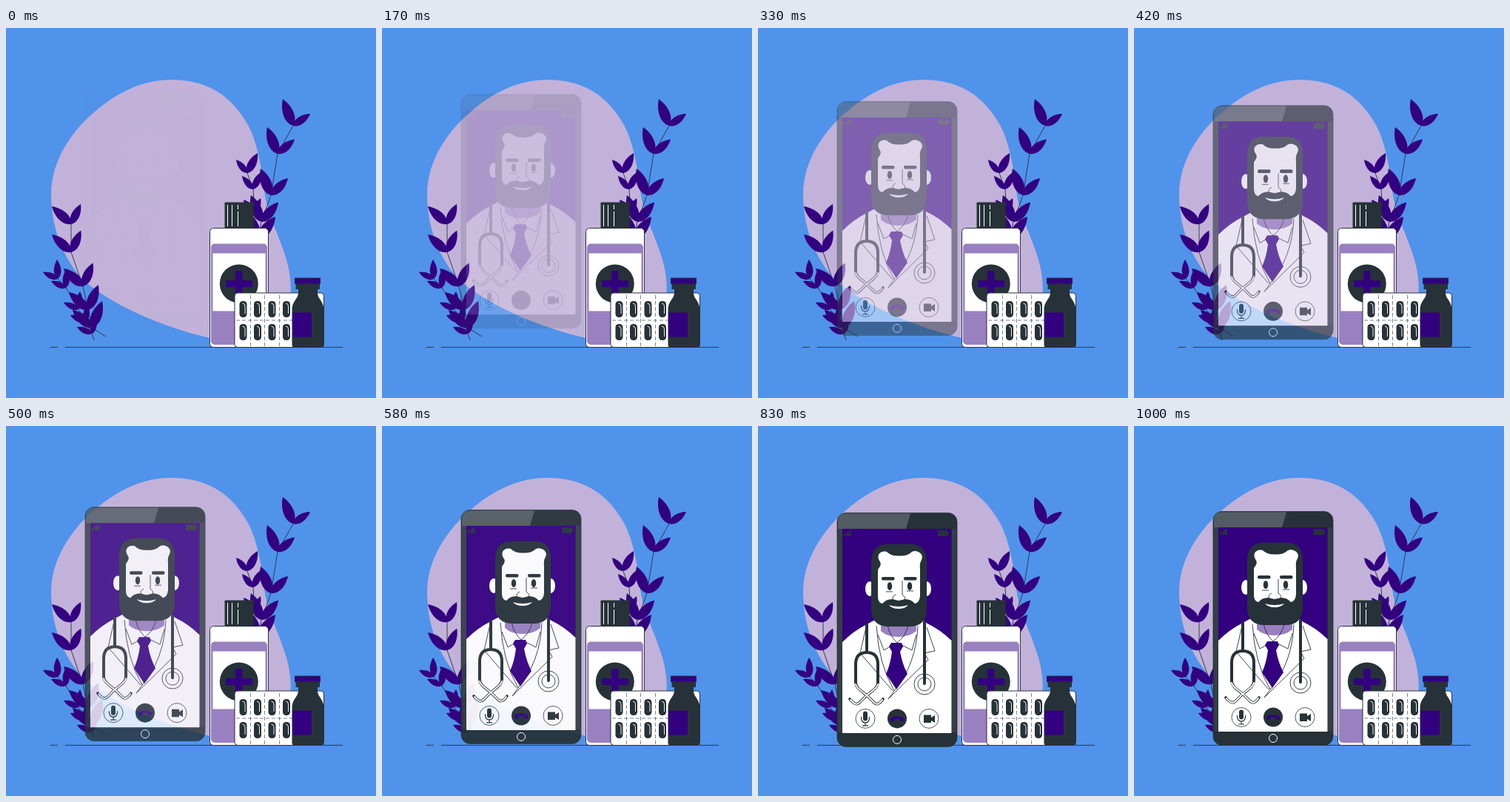
Recreate the animation shown at these times as an HTML page. Size 500 by 500 pixels, loop 1.04 s.

```html
<!DOCTYPE html>
<html lang="en">
<head>
<meta charset="utf-8">
<title>Online doctor</title>
<style>
  html, body { margin: 0; height: 100%; overflow: hidden; background: #5093eb; }
  svg { display: block; width: 100vw; height: 100vh; }
  .ink { fill: #263238; }
  .violet { fill: #330080; }
  .lilac { fill: #9980c0; }
  .white { fill: #fff; }
  .line { fill: none; stroke: #263238; stroke-width: .9; stroke-linejoin: round; }
  .card { fill: #fff; stroke: #263238; }
  .tube { fill: none; stroke: #263238; stroke-width: 4; stroke-linecap: round; }
  .arm { stroke-width: 3.6; }
  .core { fill: none; stroke: #fff; stroke-width: 1.9; stroke-linecap: round; }
  .dash { fill: none; stroke: #263238; stroke-width: .6; stroke-dasharray: 5 3; }
</style>
</head>
<body>
<svg viewBox="0 0 500 500">
  <path fill="#c2b2d9" d="M223 70C266 70 302 86 327 131C341 157 346 195 349 220C354 256 368 276 379 313C386 338 387 362 380 380C365 415 320 424 276 419C240 411 165 388 112 347C82 322 61 275 61 225C61 180 88 140 120 113C150 87 185 70 223 70Z"/>
  <path class="line" d="M59.500 431.400H70M80 431.400H455"/>

  <g id="plants" class="violet"></g>

  <g id="phone" opacity="0">
    <rect class="ink" x="107" y="115.500" width="162" height="316" rx="12" stroke="#263238" stroke-width=".8"/>
    <path fill="#525c62" d="M108 137V127Q108 116.300 119 116.300H206L200 137Z"/>
    <path fill="#343f45" d="M108 137H114V412H108ZM261.500 137H268V412H261.500Z"/>
    <rect class="violet" x="114" y="137" width="147.500" height="276"/>
    <path class="ink" d="M116 147V144H118V147ZM118.500 147V142H120.500V147ZM121 147V140.500H123V147ZM123.500 147V139H126V147ZM243 139H256V141H258V145H256V147H243Z"/>

    <!-- Coat and neck -->
    <path class="white" d="M114 290Q129 275 147 266L160 259H220L229 265Q246 273 261.500 288V413H114Z"/>
    <path class="lilac" d="M166 256H214V275Q204 283 190 283Q175 283 166 275Z"/>
    <path class="line" d="M146 270L138 305L182 356M228 270L239 302L225 305L230 314L176 367L184 356M160 268Q163 320 184 356M216 268Q214 320 184 356"/>
    <path class="line" d="M175 267Q178 282 188 291L170 301L162 280M203 267Q200 282 188 291L208 301L214 280"/>
    <path class="violet" d="M180 291H194L196 296L192 303Q195 320 202 333L187 354L173 333Q179 320 181 303L177 296Z"/>

    <!-- Head -->
    <ellipse class="white" cx="151" cy="218" rx="6" ry="10"/>
    <ellipse class="white" cx="228" cy="218" rx="6" ry="10"/>
    <path class="ink" d="M153 183C153 166 160 158 176 157.500H206C221 158 228 166 228 183V245Q228 269 204 269H177Q153 269 153 245Z"/>
    <path class="white" d="M162 192C166 187 167 184 164 180C159 171 167 166 174 168Q180 174 191 173.500Q202 174 208 168C215 165 225 171 221 179C218 184 219 188 219 192V228Q218 237 212 238Q207 232 199 232L190 234L181 232Q173 232 168 238Q162 237 162 228Z"/>
    <rect class="ink" x="167" y="202" width="17.500" height="4.600" rx="2"/>
    <rect class="ink" x="197" y="202" width="17.500" height="4.600" rx="2"/>
    <ellipse class="ink" cx="178" cy="214.500" rx="3.200" ry="5.500"/>
    <ellipse class="ink" cx="205" cy="214.500" rx="3.200" ry="5.500"/>
    <path class="line" d="M173 222H182M201 221H210M195 207V226Q202 231 196 234M186 226Q180 229 183 233"/>
    <path class="white" d="M177 240Q190 244 203 240Q199 245 190 245Q181 245 177 240Z"/>

    <!-- Stethoscope -->
    <path class="tube arm" d="M162 344C162 354 150 358 143 366L137 372Q132 377 124 367M132 344C132 354 144 358 151 366L157 372Q162 377 169 367"/>
    <path class="core" d="M162 347C161 354 150 358 143 366L137 372Q132 377 125 368M132 347C133 354 144 358 151 366L157 372Q162 377 168 368"/>
    <path class="tube" d="M147 266V304M132 344V320Q132 304 147 304Q162 304 162 320V344M225 263V345"/>
    <circle class="line" cx="225" cy="347" r="14" style="fill:#fff"/>
    <circle class="line" cx="225" cy="347" r="9" style="fill:#fff"/>
    <path class="tube" d="M225 325V346"/>

    <!-- Call controls -->
    <g stroke-width=".8">
      <circle class="card" cx="145" cy="393.500" r="13"/>
      <circle class="ink" cx="188" cy="393.500" r="13"/>
      <circle class="card" cx="231" cy="393.500" r="13"/>
    </g>
    <rect class="ink" x="142" y="383.500" width="6" height="13" rx="3"/>
    <path class="line" d="M139.500 391V393Q140 399 145 399Q150 399 150.500 393V391M145 399V403M141 403H149" style="stroke-width:1.200"/>
    <path class="violet" d="M179 397V393Q188 387 197 393V397H192V394Q188 392.500 184 394V397Z"/>
    <path class="ink" d="M224 388.500H234V392L239 389V399L234 396V399H224Z"/>
    <circle cx="188" cy="422" r="5.500" fill="none" stroke="#fff"/>
  </g>

  <!-- Tall bottle -->
  <rect class="ink" x="295.500" y="235.500" width="39" height="35" rx="1"/>
  <path stroke="#fff" stroke-width="1" d="M299.500 239V268M305.500 239V268M313.500 239V245M313.500 248V268"/>
  <rect class="card" x="275.500" y="270.500" width="79" height="161" rx="5"/>
  <rect class="lilac" x="277" y="291.500" width="76" height="136.500" rx="5"/>
  <rect class="white" x="279.500" y="304.500" width="71" height="78"/>
  <circle class="ink" cx="314.800" cy="345.500" r="26"/>
  <path class="violet" d="M310 328H319.500V341H333V350H319.500V363H310V350H297V341H310Z"/>

  <!-- Blister pack -->
  <rect class="card" x="309" y="358" width="120.500" height="73.500" rx="4"/>
  <path class="dash" d="M330.500 361V430M349.500 361V430M369.500 361V430M311 395H388"/>
  <g id="pills"></g>

  <!-- Small bottle -->
  <path class="ink" d="M390 337.500H425V346H424V353H421V357C421 367 429.500 368 429.500 382V428Q429.500 431.500 426 431.500H390Q386.500 431.500 386.500 428V382C386.500 368 395 367 395 357V353H391.500V346H390Z"/>
  <path class="violet" d="M391 338.500H424.500V345.500H391ZM387 384.500H413V417.500H387Z"/>
</svg>
<script>
  const byId = id => document.getElementById(id);
  const lerp = (a, b, t) => a + (b - a) * t;

  function leaf(x, y, dx, dy) {
    const at = (along, side) => `${x + dx * along - dy * side} ${y + dy * along + dx * side}`;
    return `<path d="M${x} ${y}C${at(.22, .28)} ${at(.68, .21)} ${at(1, 0)}` +
           `C${at(.68, -.21)} ${at(.22, -.28)} ${x} ${y}Z"/>`;
  }

  // A stem carries a pair of leaves at every node; the right ones turn from top to bottom.
  function plant(nodes, foot, left, rightTop, rightBottom) {
    const stem = `<path class="line" d="M${[...nodes, foot].join('L')}"/>`;
    return stem + nodes.map(([x, y], i) => {
      const t = i / (nodes.length - 1);
      const right = rightTop.map((v, k) => lerp(v, rightBottom[k], t));
      return leaf(x, y, ...left) + leaf(x, y, ...right);
    }).join('');
  }

  byId('plants').innerHTML =
    plant([[388, 132], [367, 170], [358, 226], [345, 262], [341, 285]], [338, 300], [-14, -36], [23, -16], [23, -30]) +
    plant([[326, 196], [334, 218], [336, 250]], [336, 280], [-15, -18], [14, -27], [8, -20]) +
    plant([[88, 265], [88, 303], [104, 349], [111, 381], [116, 405]], [135, 417], [-26, -24], [13, -27], [14, -36]) +
    plant([[70, 339], [81, 351], [98, 380], [107, 397], [116, 413]], [119, 422], [-20, -9], [-1, -26], [5, -22]);

  function pill(x, y) {
    return `<rect class="ink" x="${x - 5}" y="${y - 11}" width="10" height="22" rx="4.500"/>` +
           `<path d="M${x - 1} ${y - 8}Q${x + 2.5} ${y - 8} ${x + 2.5} ${y - 4}V${y + 6}" fill="none" stroke="#fff" stroke-width=".9"/>`;
  }
  let pills = '';
  for (let i = 0; i < 8; i++) pills += pill(320.5 + i % 4 * 19.5, i < 4 ? 380 : 411);
  byId('pills').innerHTML = pills;

  // cubic-bezier(.36, -.01, .5, 1.38)
  const curve = (s, a, b) => 3 * (1 - s) ** 2 * s * a + 3 * (1 - s) * s * s * b + s ** 3;
  function ease(t) {
    let lo = 0, hi = 1;
    for (let i = 0; i < 24; i++) {
      const mid = (lo + hi) / 2;
      if (curve(mid, .36, .5) < t) lo = mid; else hi = mid;
    }
    return curve(hi, -.01, 1.38);
  }

  const phone = byId('phone'), loop = 1040, fps = 24;
  function draw() {
    const step = Math.min(24, Math.floor((performance.now() % loop + 5) * fps / 1000));
    const p = ease(Math.min(1, (step + .8) / fps));
    phone.setAttribute('transform', `translate(0 ${30 * (p - 1)})`);
    phone.setAttribute('opacity', Math.max(0, Math.min(1, p)));
    requestAnimationFrame(draw);
  }
  draw();
</script>
</body>
</html>
```
